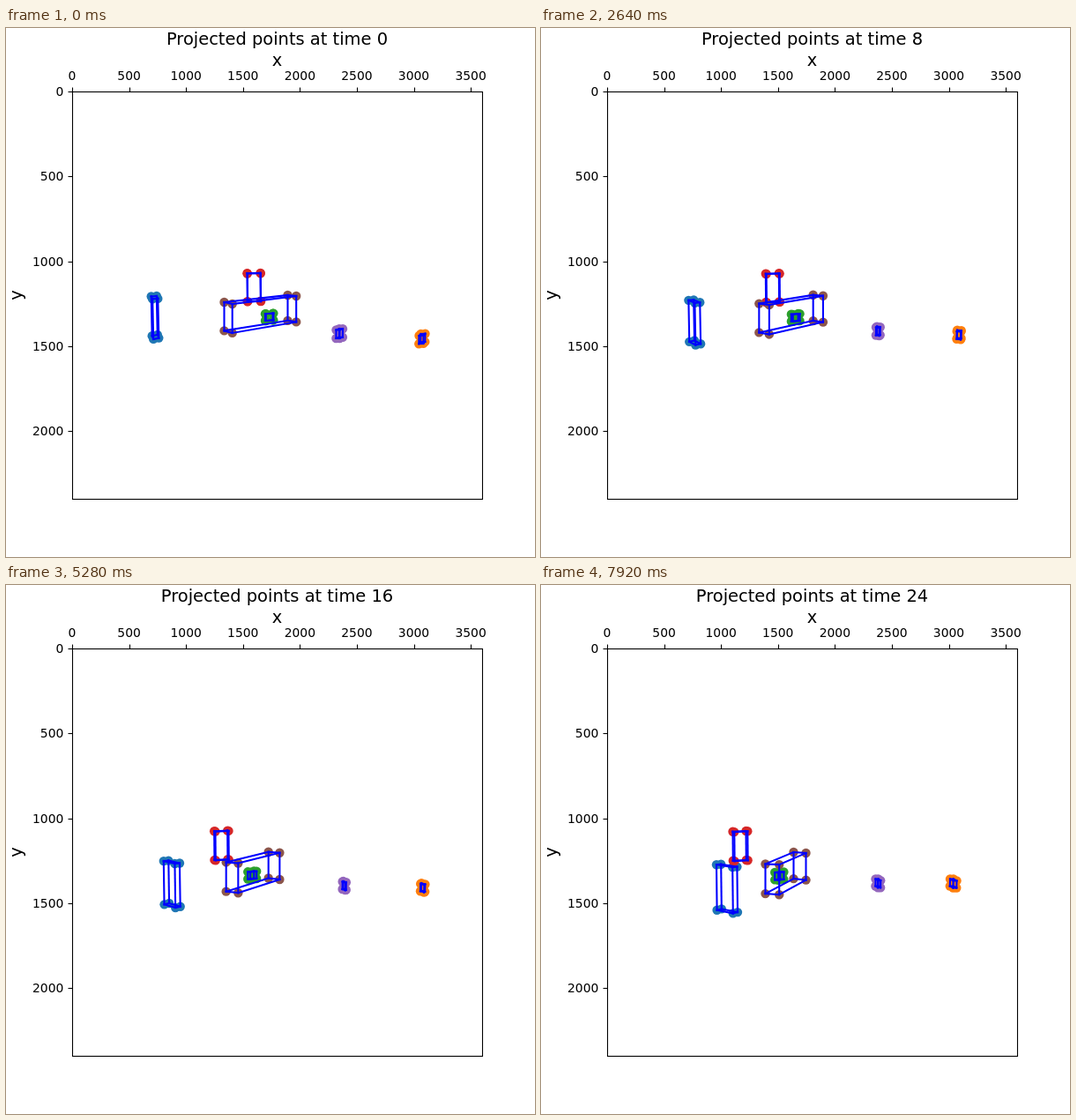
An HTML page with a canvas that plays this animation: 600x600 px, repeating every 8000 ms.

```html
<!DOCTYPE html>
<html lang="en">
<head>
<meta charset="utf-8">
<title>Projected points</title>
<style>
  html, body { margin: 0; width: 100%; height: 100%; overflow: hidden; background: #fff; }
  canvas { display: block; }
</style>
</head>
<body>
<canvas id="plot" width="600" height="600"></canvas>
<script>
const ctx = document.getElementById('plot').getContext('2d');
const LOOP = 8000, STEP = 330, LAST = 24;
const AXES = { left: 75, top: 72, right: 540, bottom: 534 };

// Each box: corner `at`, edge vectors `u`, `v` and `h` (height).
// A coordinate is a constant, [start, end] or [start, middle, end].
// `grow` lengthens the height along u and v; `twist` shifts the corner at u + v.
const boxes = [
  { color: '#1f77b4', at: [[164.7, 172, 199], [304.5, 311, 317.2]],
    u: [[6.1, 5.2], -0.5], v: [[1.5, 18.2], 2.9], h: [[1, 0.6], [44.7, 51.5]], grow: [-0.8, 0.8] },
  { color: '#ff7f0e', at: [[468.5, 471.5, 464], [349, 341.5, 333.5]],
    u: [[2, 0.5, 3.8], [-2, 0]], v: [[5, 4.4, 3.7], [-0.3, 2]], h: [-0.2, [9.2, 8]] },
  { color: '#2ca02c', at: [[294, 279, 265.2], [324.2, 325, 326]],
    u: [[0.8, 4], [0, 0.4]], v: [[8.6, 6.2], [-0.6, -0.9]], h: [0, [7.8, 8.4]] },
  { color: '#d62728', at: [[273.5, 217.5], [278.2, 279.8]],
    u: [15, [-0.3, -0.8]], v: [[0.3, 1.8], 0.3], h: [0.3, [31.9, 33]] },
  { color: '#9467bd', at: [[374.5, 381.3, 379.5], [342.5, 338, 333.5]],
    u: [[3.5, 0.7, 3], [-1.3, 0]], v: [[4, 3.5, 2.7], [0, 1.7]], h: [-0.1, [9.5, 8]] },
  { color: '#8c564b', at: [[247.5, 248.2, 254.5], [311, 313.5, 316.5]],
    u: [[9.2, 12.6, 15.7], [2, 0.6]], v: [[72, 55, 32], [-8, -13.5]], h: [0, [32.4, 33.6]],
    grow: [0.5, -3.5], twist: [[0.5, -1.7], [-1, 0.4]] },
];

function valueAt(keys, s) {
  if (!Array.isArray(keys)) return keys;
  if (keys.length === 2) return keys[0] + (keys[1] - keys[0]) * s;
  const [a, b, c] = keys;
  return a * (1 - s) * (1 - 2 * s) + b * 4 * s * (1 - s) + c * s * (2 * s - 1);
}

// Corner index bits: 1 = along u, 2 = along v, 4 = along h.
function cornersAt(box, s) {
  const vec = name => (box[name] || [0, 0]).map(keys => valueAt(keys, s));
  const [at, u, v, h, twist] = ['at', 'u', 'v', 'h', 'twist'].map(vec);
  const [growU, growV] = box.grow || [0, 0];
  return Array.from({ length: 8 }, (_, i) => {
    const a = i & 1, b = i >> 1 & 1, c = i >> 2;
    const [x, y] = [0, 1].map(k => at[k] + a * u[k] + b * v[k] + c * h[k] + a * b * twist[k]);
    return [x, y + c * (a * growU + b * growV)];
  });
}

function line(x1, y1, x2, y2) {
  ctx.beginPath();
  ctx.moveTo(x1, y1);
  ctx.lineTo(x2, y2);
  ctx.stroke();
}

function text(str, x, y, size, align = 'center') {
  ctx.font = `${size}px "DejaVu Sans", sans-serif`;
  ctx.textAlign = align;
  ctx.fillText(str, x, y);
}

function drawAxes(step) {
  const { left, top, right, bottom } = AXES;
  const small = 13.89, large = 19.44, tick = 5;
  ctx.fillStyle = ctx.strokeStyle = '#000';
  ctx.lineWidth = 1.1;
  ctx.lineCap = 'butt';
  ctx.strokeRect(left + 0.5, top + 0.5, right - left, bottom - top);
  for (let n = 0; n <= 3500; n += 500) {
    const x = left + n * (right - left) / 3600;
    const px = Math.round(x) + 0.5;
    line(px, top - tick + 0.5, px, top + 0.5);
    text(n, x, 59, small);
  }
  for (let n = 0; n <= 2000; n += 500) {
    const y = Math.round(top + n * (bottom - top) / 2400);
    line(left - tick + 0.5, y + 0.5, left + 0.5, y + 0.5);
    text(n, left - 9.7, y + 5, small, 'right');
  }
  text(`Projected points at time ${step}`, 307.5, 19, large);
  text('x', 307.5, 43, large);
  ctx.save();
  ctx.translate(18, 303);
  ctx.rotate(-Math.PI / 2);
  text('y', 0, 0, large);
  ctx.restore();
}

function drawBoxes(s) {
  const shapes = boxes.map(box => cornersAt(box, s));
  shapes.forEach((corners, i) => {
    ctx.fillStyle = boxes[i].color;
    for (const [x, y] of corners) {
      ctx.beginPath();
      ctx.arc(x, y, 5.2, 0, 2 * Math.PI);
      ctx.fill();
    }
  });
  ctx.strokeStyle = '#00f';
  ctx.lineWidth = 2.08;
  ctx.lineCap = 'square';
  for (const corners of shapes)
    corners.forEach((p, i) => {
      for (const bit of [1, 2, 4])
        if (!(i & bit)) line(...p, ...corners[i | bit]);
    });
}

const start = performance.now();
function draw() {
  const step = Math.floor((performance.now() - start) % LOOP / STEP);
  ctx.fillStyle = '#fff';
  ctx.fillRect(0, 0, 600, 600);
  drawBoxes(step / LAST);
  drawAxes(step);
  requestAnimationFrame(draw);
}
draw();
</script>
</body>
</html>
```
